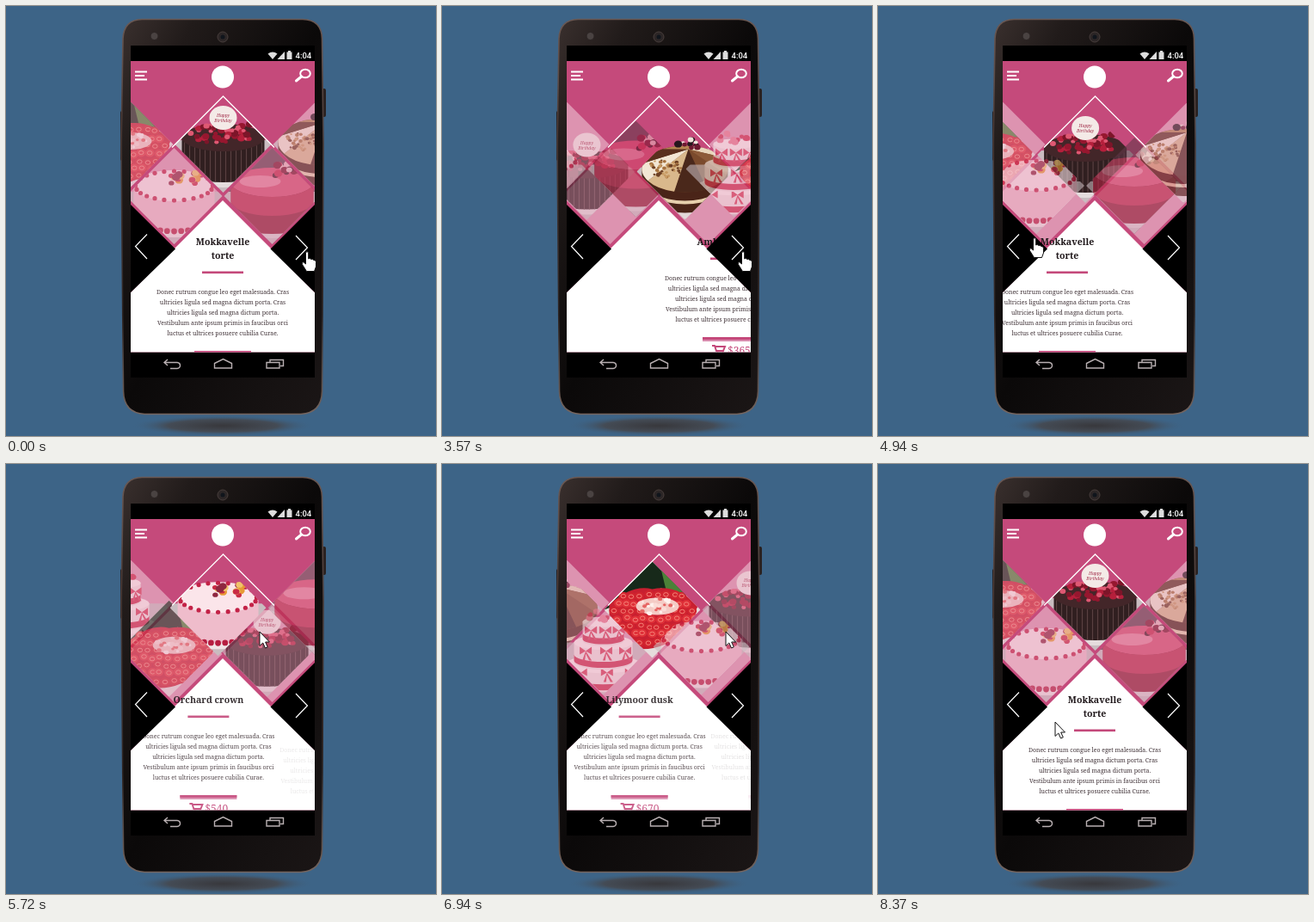
Animation of 500 by 500 pixels, one loop 8.44 s. Source, as an HTML page:

```html
<!DOCTYPE html>
<html lang="en">
<head>
<meta charset="utf-8">
<title>Cake shop carousel</title>
<style>
html, body { margin: 0; width: 100%; height: 100%; overflow: hidden; background: #3d6487; }
svg { display: block; width: 100vw; height: 100vh; }
.copy { font-family: "Noto Serif", serif; text-anchor: middle; }
.title { font-size: 10.6px; font-weight: 600; fill: #21191c; }
.body { font-size: 6.9px; fill: #3f3136; }
.price { font-size: 12px; fill: #c4487a; text-anchor: start; }
.clock { font: 500 9.5px Roboto, sans-serif; fill: #fff; }
.plaque { font: italic 5px "Noto Serif", serif; fill: #a3304c; text-anchor: middle; }
.line { fill: none; stroke: #fff; }
</style>
</head>
<body>
<svg viewBox="0 0 500 500">
  <defs>
    <linearGradient id="shell" x1="0" y1="0" x2="1" y2="1">
      <stop offset="0" stop-color="#3a302e"/><stop offset=".18" stop-color="#211b1a"/>
      <stop offset=".5" stop-color="#0b0909"/><stop offset="1" stop-color="#1b1616"/>
    </linearGradient>
    <linearGradient id="rim" x1="0" y1="0" x2="0" y2="1">
      <stop offset="0" stop-color="#6a5853"/><stop offset=".3" stop-color="#4a3b38"/>
      <stop offset=".75" stop-color="#2b2322"/><stop offset="1" stop-color="#75655f"/>
    </linearGradient>
    <radialGradient id="shade">
      <stop offset="0" stop-color="#38383c"/><stop offset=".6" stop-color="#444b55"/>
      <stop offset="1" stop-color="#3d6487" stop-opacity="0"/>
    </radialGradient>
    <clipPath id="screen"><rect x="145" y="64" width="214" height="338.5"/></clipPath>
    <clipPath id="gem"><path d="M0-56 56 0 0 56-56 0z"/></clipPath>
  </defs>

  <rect width="500" height="500" fill="#3d6487"/>
  <ellipse cx="252" cy="488" rx="106" ry="12" fill="url(#shade)"/>
  <rect x="133" y="122" width="5" height="58" rx="2" fill="#1a1414"/>
  <rect x="366" y="96" width="6" height="33" rx="2" fill="#2a2120"/>
  <path d="M158 15.5H345Q367 16 367.5 38L369 160 367.5 448Q367 473 343 474.500H161Q137 473 136.500 448L134 160 136 38Q137 16 158 15.500z"
        fill="url(#shell)" stroke="url(#rim)" stroke-width="1.6"/>
  <rect x="145" y="46" width="214" height="386" fill="#000"/>
  <circle cx="252" cy="36" r="6" fill="#2c2626" stroke="#483e3c"/>
  <circle cx="252" cy="36" r="2.500" fill="#10151c"/>
  <circle cx="172.500" cy="35" r="4.500" fill="#4a4342" stroke="#2a2322"/>

  <g fill="#ddd">
    <path d="M304.500 55.500Q310 51.500 315.500 55.500L310 62z"/>
    <path d="M315.500 62 324 53V62z"/>
    <path d="M326.500 53.500H328V52H331V53.500H332.500V62H326.500z"/>
  </g>
  <text class="clock" x="336.500" y="61">4:04</text>

  <g clip-path="url(#screen)">
    <rect x="145" y="64" width="214" height="340" fill="#c54a7b"/>
    <g id="slots" fill="#fff" fill-opacity=".4"></g>
    <g id="cakes"></g>
    <path d="M252 226 359 333V404H145V333z" fill="#fff"/>
    <g id="texts"></g>
    <path d="M145 231 197 282.500 145 333zM359 231 307.500 282.500 359 333z"/>
    <path class="line" d="M193 164.500 252.500 105 312 164.500" stroke-width="1.300"/>
    <path class="line" d="M164 265.500 150.500 279.500 164 294M337 267 350.500 281 337 295" stroke-width="1.200"/>
    <path class="line" d="M150 76.500H164M150 81H161M150 85.500H164" stroke-width="1.800"/>
    <circle cx="252" cy="82.500" r="13" fill="#fff"/>
    <ellipse class="line" cx="348" cy="78.500" rx="5.800" ry="4.800" stroke-width="2"/>
    <path class="line" d="M343.500 82 337.500 87" stroke-width="3" stroke-linecap="round"/>
  </g>

  <g fill="none" stroke="#b9b0b2" stroke-width="1.400">
    <path d="M188 411 184 414.500 188 418M184 414.500H199Q202.500 415 202.500 418T199 421.500H191"/>
    <path d="M242.500 421V415.500L252.500 410.500 262.500 415.500V421z"/>
    <path d="M303 414.500H318V421H303zM307 414V411.500H322.500V418.500H319"/>
  </g>

  <g id="cursor" stroke="#111" stroke-width="1" stroke-linejoin="round" fill="#fff">
    <path id="arrow" d="M0 0V16.500L3.800 13 6.500 19 9.300 17.800 6.700 12H11.500z"/>
    <path id="hand" d="M-1.500 1Q0-2 1.700 1V8Q3 6.500 4.800 8.500 6.500 7.500 7.800 9.500 10 9 10.500 11.500V17L8.500 22.500H-.5L-5.500 14.500Q-6.500 11.500-4 11.700L-1.500 14z"/>
  </g>
</svg>

<script>
const LOOP = 8440, COUNT = 6;
const $ = id => document.getElementById(id);
const mod = (a, n) => ((a % n) + n) % n;

// Drawing helpers
const ell = (x, y, rx, ry, fill, extra = '') =>
  `<ellipse cx="${x}" cy="${y}" rx="${rx}" ry="${ry}" fill="${fill}" ${extra}/>`;
const path = (d, fill) => `<path d="${d}" fill="${fill}"/>`;
const drum = (y, rx, ry, h, side, top) =>
  path(`M${-rx} ${y}V${y + h}A${rx} ${ry} 0 0 0 ${rx} ${y + h}V${y}z`, side) + ell(0, y, rx, ry, top);

function random(seed) {
  return () => (seed = (seed * 16807) % 2147483647) / 2147483647;
}

function scatter(n, seed, x, y, rx, ry, size, colors) {
  const rnd = random(seed);
  let out = '';
  for (let i = 0; i < n; i++) {
    const a = rnd() * 6.283, r = Math.sqrt(rnd()), s = size * (.6 + rnd() * .6);
    out += ell((x + Math.cos(a) * r * rx).toFixed(1), (y + Math.sin(a) * r * ry).toFixed(1),
      s.toFixed(1), (s * .85).toFixed(1), colors[i % colors.length]);
  }
  return out;
}

function ring(n, y, rx, ry, size, fill, from = 0, to = Math.PI * 2) {
  let out = '';
  for (let i = 0; i <= n; i++) {
    const a = from + (to - from) * i / n;
    out += ell((Math.cos(a) * rx).toFixed(1), (y + Math.sin(a) * ry).toFixed(1), size, size, fill);
  }
  return out;
}

const floor = path('M-56-5H56V56H-56z', '#c9bcc0');

function chocolate() {
  let ridges = '';
  for (let x = -45; x <= 45; x += 6) {
    const y = 16 * Math.sqrt(1 - (x / 48) ** 2);
    ridges += `<path d="M${x} ${y - 8}v36" stroke="#594041" stroke-width="1.2"/>`;
  }
  return floor + ell(0, 33, 54, 17, '#e5dcdd') + drum(-8, 48, 16, 36, '#301f20', '#432629') + ridges +
    scatter(60, 17, 0, -15, 39, 14, 4, ['#b51f3b', '#7d1529', '#df5873', '#96172f']) +
    ell(0, -31, 16, 14, '#f4eae7') +
    '<text class="plaque" y="-32">Happy</text><text class="plaque" y="-26">Birthday</text>';
}

function glossy() {
  return path('M-56-56H56V56H-56z', '#62394a') + floor + ell(0, 31, 54, 18, '#d9ced1') +
    drum(-16, 48, 17, 43, '#8d1830', '#d6476a') +
    path('M-48-16V6A48 17 0 0 0 48 6V-16A48 17 0 0 1-48-16z', '#b92647') +
    ell(-14, -17, 24, 7, '#e67e98') +
    scatter(14, 41, 12, -30, 22, 8, 4.5, ['#7b1129', '#e9b5bb', '#c52344', '#471220']);
}

function assorted() {
  const tones = ['#7b4a2c', '#4a281b', '#d9b88c', '#f2e6d4', '#5a301e', '#b58652', '#e8d6bb', '#8d5b39'];
  let wedges = '';
  const at = a => `${(50 * Math.cos(a)).toFixed(1)} ${(-3 + 27 * Math.sin(a)).toFixed(1)}`;
  tones.forEach((c, i) => {
    const a = i * Math.PI / 4 + .25;
    wedges += path(`M4-26L${at(a)}A50 27 0 0 1 ${at(a + Math.PI / 4)}z`, c);
  });
  return floor + ell(0, 28, 55, 27, '#e2d8d8') + drum(-3, 50, 27, 24, '#4a2418', '#6b3f26') +
    path('M-50 7A50 27 0 0 0 50 7V11A50 27 0 0 1-50 11z', '#e7cfad') + wedges +
    scatter(45, 7, -23, -4, 19, 11, 2, ['#a5713f', '#c79a63', '#6d4025']) +
    scatter(12, 23, 4, -32, 13, 7, 4, ['#26171d', '#efe3da', '#6d1930']);
}

function ribbons() {
  let out = floor + ell(0, 38, 53, 14, '#e9dcdf');
  [[20, 43, 22], [-5, 34, 23], [-29, 24, 22]].forEach(([y, rx, h]) => {
    const ry = rx / 4;
    out += drum(y, rx, ry, h, '#f5e3e4', '#fff3f3') +
      path(`M${-rx} ${y + h - 9}A${rx} ${ry} 0 0 0 ${rx} ${y + h - 9}v7A${rx} ${ry} 0 0 1 ${-rx} ${y + h - 2}z`, '#cc2748');
    for (const x of [-rx * .6, rx * .1, rx * .75])
      out += path(`M${x} ${y + 10}l-7-5v9zl7-5v9zl-4 11h3l1-8 4 8h3z`, '#d73956');
  });
  return out + scatter(12, 5, 0, -36, 18, 6, 4, ['#ce2848', '#ec7890']);
}

function roses() {
  const rnd = random(91);
  let out = path('M-56-56H56V56H-56z', '#e6dcdc') + path('M-56-56H56V-12L10-25-56 0z', '#17291a') +
    path('M8-56 35-20 16-23z', '#4c8238') + path('M-50-6Q-24-30 0-24 30-30 53-4L38 25Q10 50-22 45L-50 14z', '#c81f30');
  for (let row = 0; row < 7; row++) {
    for (let col = 0; col < 10; col++) {
      const x = -46 + col * 10 + (row % 2) * 4 + rnd() * 3, y = -18 + row * 9 + rnd() * 3;
      if ((x / 54) ** 2 + ((y - 10) / 36) ** 2 > 1) continue;
      out += ell(x.toFixed(1), y.toFixed(1), 5.5, 4.8, row % 2 ? '#df3038' : '#d2242f') +
        ell(x.toFixed(1), y.toFixed(1), 2.8, 2.2, 'none', 'stroke="#f58076" stroke-width="1"');
    }
  }
  return out + ell(6, -4, 25, 10, '#f4cbc5') + scatter(28, 12, 6, -4, 24, 9, 2.5, ['#fff1ed', '#e66563', '#fbdcd7']);
}

function fruit() {
  return floor + ell(0, 28, 54, 20, '#f1e4e6') + drum(-12, 47, 18, 35, '#efbccb', '#fbe5ea') +
    ring(24, -12, 45, 17, 2.6, '#c32247') + ring(18, 23, 47, 18, 3.4, '#b61d40', 0, Math.PI) +
    scatter(16, 33, 13, -20, 22, 9, 4.5, ['#e89a34', '#c92a44', '#f0c36a', '#8f2740']);
}

const SLIDES = [
  { art: chocolate, title: ['Mokkavelle', 'torte'], price: 420 },
  { art: glossy, title: ['Cherrymoon', 'glaze'], price: 510 },
  { art: assorted, title: ['Amber medley'], price: 365 },
  { art: ribbons, title: ['Ribbon tiers'], price: 780 },
  { art: roses, title: ['Lilymoor dusk'], price: 670 },
  { art: fruit, title: ['Orchard crown'], price: 540 }
];
const COPY = [
  'Donec rutrum congue leo eget malesuada. Cras',
  'ultricies ligula sed magna dictum porta. Cras',
  'ultricies ligula sed magna dictum porta.',
  'Vestibulum ante ipsum primis in faucibus orci',
  'luctus et ultrices posuere cubilia Curae.'
];

function textBlock({ title, price }) {
  const y = (title.length - 1) * 16;
  return title.map((s, i) => `<text class="title" y="${278 + i * 16}">${s}</text>`).join('') +
    `<rect x="-24" y="${292.5 + y}" width="48" height="2.6" fill="#c4487a"/>` +
    COPY.map((s, i) => `<text class="body" y="${319 + y + i * 12}">${s}</text>`).join('') +
    `<g transform="translate(0 ${y})"><rect x="-33" y="385" width="66" height="5" fill="#d98bad"/>` +
    '<rect x="-33" y="385" width="66" height="3" fill="#c4487a"/>' +
    '<path d="M-22 395h3l2 6h8l2-5h-11M-16 403h1M-10 403h1" fill="none" stroke="#c4487a" stroke-width="2"/>' +
    `<text class="price" x="-4" y="405">$${price}</text></g>`;
}

// Places along the zigzag, in slides from the centre
const spot = d => `translate(${252.5 + 57 * d} ${161 + 60 * (1 - Math.abs(mod(d, 2) - 1))})`;

$('slots').innerHTML = [-2, -1, 1, 2]
  .map(d => `<path d="M0-56 56 0 0 56-56 0z" transform="${spot(d)}"/>`).join('');
$('cakes').innerHTML = SLIDES.map(s => `<g><g clip-path="url(#gem)">${s.art()}</g></g>`).join('');
$('texts').innerHTML = SLIDES.map(s => `<g class="copy">${textBlock(s)}</g>`).join('');
const cakes = [...$('cakes').children], texts = [...$('texts').children];

// Moving stretches: start, end, number of steps
const RUNS = [[470, 780, 5], [3570, 4290, 10], [4770, 5570, 11], [5640, 6420, 11],
  [6500, 6650, 3], [6870, 7650, 11], [7730, 8370, 9]];

// Time, carousel position
const SLIDE_KEYS = [[0, 0], [469, 0], [470, .475], [548, .75], [625, .9], [780, 1],
  [3569, 1], [3570, 1.475], [3650, 1.75], [3730, 1.9], [3810, 2],
  [4049, 2], [4050, 1.525], [4130, 1.25], [4210, 1.08], [4290, 1],
  [4769, 1], [4770, .7], [4850, .4], [4930, .2], [5010, .07], [5090, 0],
  [5330, 0], [5570, -.6], [5720, -.9], [5800, -1], [5950, -1], [6186, -1.675], [6420, -2],
  [6870, -2], [6948, -1.86], [7180, -1.3], [7420, -1], [7730, -1], [7960, -.4], [8200, 0], [LOOP, 0]];

// Time, pointer tip
const POINTER_KEYS = [[0, 350, 286], [3729, 350, 286], [4050, 157, 276], [4770, 157, 276],
  [4930, 182, 270], [5330, 240, 185], [5570, 330, 195], [5950, 240, 195], [6186, 330, 190],
  [6420, 330, 191], [6650, 330, 195], [6948, 330, 195], [7300, 200, 200], [7730, 330, 200],
  [8050, 210, 205], [8370, 206, 300], [LOOP, 206, 300]];

function track(keys, t) {
  const i = Math.max(1, keys.findIndex(k => k[0] >= t));
  const a = keys[i - 1], b = keys[i], u = (t - a[0]) / (b[0] - a[0]);
  return a.slice(1).map((v, n) => v + (b[n + 1] - v) * u);
}

function snap(t) {
  let held = 0;
  for (const [from, to, steps] of RUNS) {
    if (t < from) break;
    const gap = (to - from) / (steps - 1);
    held = t >= to ? to : Math.min(to, from + Math.floor((t - from + 9) / gap) * gap);
  }
  return held;
}

function target(t, pos) {
  if (t < 470) return 0;
  if (t < 3570) return 1;
  if (t < 4050) return 2;
  if (t < 4770) return 1;
  return t < 5200 ? 0 : Math.round(pos);
}

function draw() {
  const t = snap(performance.now() % LOOP);
  const [pos] = track(SLIDE_KEYS, t);
  const active = mod(target(t, pos), COUNT), dragging = t > 5200;
  for (let i = 0; i < COUNT; i++) {
    const d = mod(i - pos + 3, COUNT) - 3;
    const on = i === active;
    cakes[i].setAttribute('transform', spot(d));
    cakes[i].setAttribute('opacity', on ? 1 : .58);
    texts[i].setAttribute('transform', `translate(${252 + 160 * d} 0)`);
    texts[i].setAttribute('opacity', dragging ? Math.max(0, 1 - Math.abs(d)) : +on);
  }
  const [x, y] = track(POINTER_KEYS, t);
  const hand = y > 240 && (x > 320 || x < 190);
  $('cursor').setAttribute('transform', `translate(${x} ${y})`);
  $('hand').setAttribute('visibility', hand ? 'visible' : 'hidden');
  $('arrow').setAttribute('visibility', hand ? 'hidden' : 'visible');
  requestAnimationFrame(draw);
}
draw();
</script>
</body>
</html>
```
